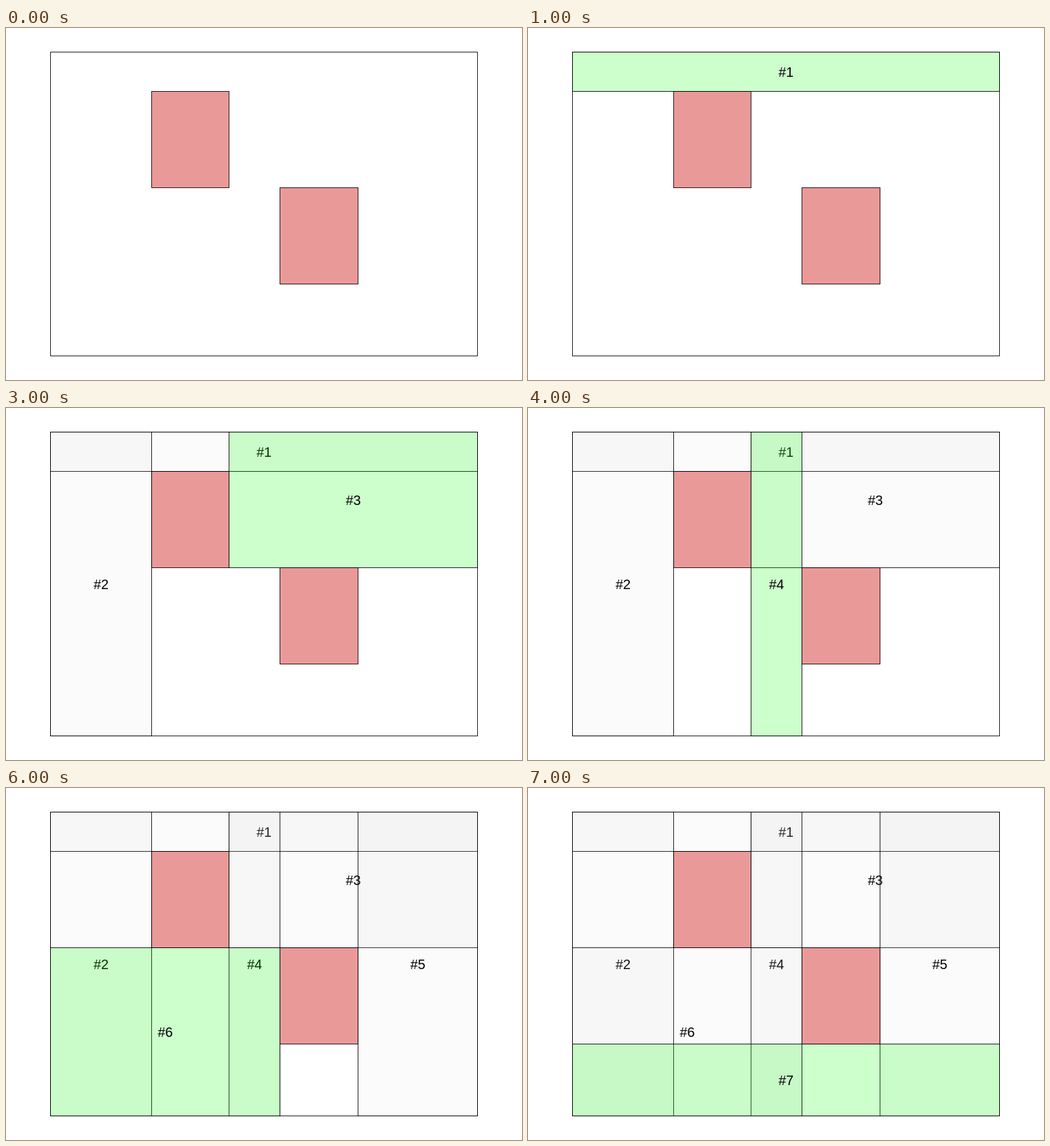
An HTML page with a canvas for the animation above (8000 ms loop, 760x519 px).

```html
<!DOCTYPE html>
<html lang="en">
<head>
<meta charset="utf-8">
<title>Free rectangles</title>
<style>
  html, body { margin: 0; width: 100%; height: 100%; overflow: hidden; background: #fff; }
  canvas { display: block; }
</style>
</head>
<body>
<canvas id="stage" width="760" height="519"></canvas>
<script>
const ctx = document.getElementById('stage').getContext('2d');
const STEP = 1000;
const GREEN = 'rgba(0, 255, 0, 0.2)';
const GREY = 'rgba(205, 205, 205, 0.09)';
const RED = '#ea9999';
const LINE = 'rgba(0, 0, 0, 0.88)';

const rect = (left, top, right, bottom) => ({ left, top, right, bottom });
const frame = rect(65, 35, 694, 483);
const blocks = [rect(214, 93, 328, 235), rect(403, 235, 518, 377)];

const overlap = (a, b) =>
  a.left < b.right && b.left < a.right && a.top < b.bottom && b.top < a.bottom;
const contains = (a, b) =>
  a.left <= b.left && a.top <= b.top && a.right >= b.right && a.bottom >= b.bottom;

// Every distinct edge position along one axis, in ascending order
function edges(low, high) {
  const all = [frame, ...blocks].flatMap(r => [r[low], r[high]]);
  return [...new Set(all)].sort((a, b) => a - b);
}

// The largest rectangles that fit around the blocks. The loop order visits
// each rectangle before any smaller one inside it.
function freeAreas() {
  const xs = edges('left', 'right');
  const ys = edges('top', 'bottom');
  const found = [];
  for (const top of ys)
    for (const left of xs)
      for (const right of xs.filter(x => x > left).reverse())
        for (const bottom of ys.filter(y => y > top).reverse()) {
          const area = rect(left, top, right, bottom);
          const blocked = blocks.some(b => overlap(area, b));
          if (!blocked && !found.some(f => contains(f, area))) found.push(area);
        }
  return found;
}

const areas = freeAreas();

function box({ left, top, right, bottom }, fill) {
  const shape = [left + 0.5, top + 0.5, right - left, bottom - top];
  ctx.fillStyle = fill;
  ctx.fillRect(...shape);
  ctx.strokeRect(...shape);
}

function label({ left, top, right, bottom }, text) {
  ctx.fillStyle = '#000';
  ctx.fillText(text, (left + right + 1) / 2, Math.round((top + bottom + 1) / 2 + 7));
}

function draw(step) {
  ctx.fillStyle = '#fff';
  ctx.fillRect(0, 0, 760, 519);
  ctx.strokeStyle = LINE;
  ctx.lineWidth = 1;
  ctx.font = '20px "Liberation Sans", Arial, sans-serif';
  ctx.textAlign = 'center';
  box(frame, '#fff');
  blocks.forEach(b => box(b, RED));
  // Later areas tint the labels and lines beneath them
  areas.slice(0, step).forEach((area, i) => {
    box(area, i === step - 1 ? GREEN : GREY);
    label(area, '#' + (i + 1));
  });
}

const start = performance.now();
function tick() {
  const elapsed = performance.now() - start;
  draw(Math.floor(elapsed / STEP) % (areas.length + 1));
  requestAnimationFrame(tick);
}
tick();
</script>
</body>
</html>
```
